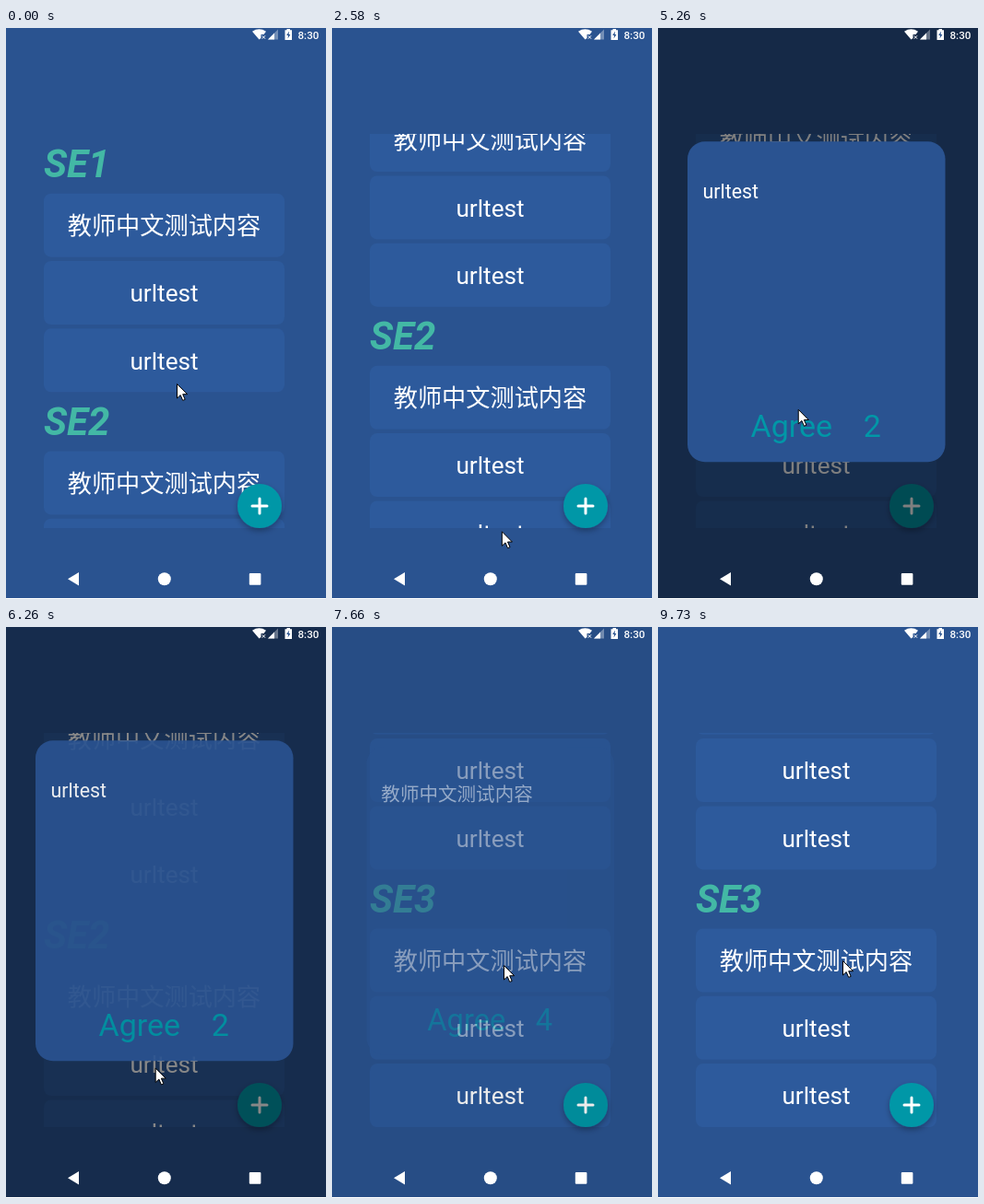
These frames come from a looping animation (347 px wide and 620 px high, 9810 ms). An HTML page:

```html
<!DOCTYPE html>
<html lang="zh">
<head>
<meta charset="utf-8">
<title>List and dialog</title>
<style>
  html, body { margin: 0; width: 100%; height: 100%; overflow: hidden; background: #2a5390; }
  svg { display: block; width: 347px; height: 620px; }
  text { font-family: Roboto, "Noto Sans CJK SC", "Noto Sans CJK", sans-serif; fill: #fff; }
  .card { font-size: 26.2px; text-anchor: middle; }
  .head { font-size: 42px; font-weight: 700; font-style: italic; fill: #43b8a5; }
  .agree { font-size: 34px; fill: #0097a7; }
</style>
</head>
<body>
<svg viewBox="0 0 347 620">
  <defs>
    <clipPath id="viewport"><rect x="41" y="115" width="261" height="428"/></clipPath>
    <filter id="shadow" x="-30%" y="-30%" width="160%" height="170%">
      <feDropShadow dx="0" dy="3" stdDeviation="3" flood-color="#000" flood-opacity=".3"/>
    </filter>
  </defs>
  <rect width="347" height="620" fill="#2a5390"/>
  <g clip-path="url(#viewport)">
    <g id="list"></g>
    <circle id="glow" cx="165" r="460" fill="#43b8a5"/>
  </g>
  <circle cx="275" cy="519" r="24" fill="#0097a7" filter="url(#shadow)"/>
  <path d="M267 519H283M275 511V527" stroke="#fff" stroke-width="3" stroke-linecap="round"/>
  <rect id="dim" width="347" height="620"/>

  <g id="dialog">
    <rect x="32" y="123.3" width="279.5" height="348" rx="19" fill="#2a5391"/>
    <text id="message" x="48.5" y="184.5" font-size="21.4"></text>
    <text class="agree" x="100.5" y="444">Agree</text>
    <text class="agree" id="count" x="222.8" y="444"></text>
  </g>

  <g fill="#fff">
    <path d="M267 3.7Q274.5 -1.2 282 3.7L279.5 7H276.5V11L274.5 12.5Z"/>
    <path d="M277.8 8.3L281 11.7M281 8.3L277.8 11.7" stroke="#fff"/>
    <path d="M284 12.5L295 1.5V12.5Z" opacity=".35"/>
    <path d="M284 12.5L291 5.5V12.5Z"/>
    <path d="M302.5 2.2H304.5V1H308V2.2H310V13H302.5Z"/>
    <path d="M307 3.5L304.2 8H306L305.6 11.5L308.4 7H306.6Z" fill="#2a5390"/>
    <text x="316.5" y="11.6" font-size="11.6" font-weight="500">8:30</text>
    <path d="M67 598.3L79 591V605.6Z"/>
    <circle cx="171.8" cy="598.3" r="7"/>
    <rect x="263.8" y="592" width="12.6" height="12.8" rx="1"/>
    <rect y="619" width="347" height="1"/>
  </g>

  <g id="cursor">
    <circle id="ring" cx="8" cy="9" r="29" fill="none" stroke="#fff" stroke-width="1.5" stroke-opacity=".5"/>
    <path d="M.5 .5V16L4.2 12.6L6.7 18.4L9.2 17.4L6.7 11.7H11.6Z" fill="#fff" stroke="#000"/>
  </g>
</svg>
<script>
const LOOP = 9810;
const FRAME = 1000 / 13, PHASE = 37;
const CHINESE = "教师中文测试内容";
const $ = id => document.getElementById(id);
const ramp = (t, from, to) => Math.max(0, Math.min(1, (t - from) / (to - from)));

// Three sections, each a heading and three cards.
const SECTION = 279.7, PITCH = 73.3;
let rows = "";
for (let s = 0; s < 3; s++) {
  const top = s * SECTION;
  rows += `<text class="head" x="41" y="${top + 162}">SE${s + 1}</text>`;
  for (let c = 0; c < 3; c++) {
    const y = top + 179.7 + c * PITCH;
    rows += `<rect x="41" y="${y}" width="261" height="69" rx="8" fill="#2d5a9c"/>
      <text class="card" x="171.5" y="${y + 44.4}">${c ? "urltest" : CHINESE}</text>`;
  }
}
$("list").innerHTML = rows;

// The three drags move the list together with the cursor.
const dragUp = { from: 945, to: 1300, x: 200, y: 101 };
const dragDown = { from: 1945, to: 2450, x: 184, y: 580 };
const dragOn = { from: 6500, to: 6860, x: 188, y: 171 };
const moves = [
  { from: 400, to: 730, x: 187, y: 415 },
  dragUp,
  { from: 1300, to: 1737, x: 203, y: 256 },
  dragDown,
  { from: 2530, to: 3040, x: 182, y: 202 },
  { from: 4080, to: 5030, x: 173, y: 462 },
  { from: 5030, to: 5410, x: 139, y: 385 },
  { from: 5410, to: 5570, x: 159, y: 477 },
  { from: 6240, to: 6490, x: 183, y: 490 },
  dragOn,
  { from: 6930, to: 7260, x: 186, y: 367 },
  { from: 7700, to: 8190, x: 168, y: 486 },
  { from: 9115, to: 9725, x: 200, y: 362 }
];
const dialogs = [
  { open: 3614, dismiss: 5720, close: 6255, message: "urltest", count: 2 },
  { open: 7617, dismiss: 8270, close: 9115, message: CHINESE, count: 4 }
];

function cursorAt(t) {
  return moves.reduce((p, m) => {
    const k = ramp(t, m.from, m.to);
    return { x: p.x + (m.x - p.x) * k, y: p.y + (m.y - p.y) * k };
  }, { x: 185, y: 386 });
}

function scrollAt(t) {
  const fling = 140;
  return 416.6 * ramp(t, dragUp.from, dragUp.to + fling)
    - 324 * ramp(t, dragDown.from, dragDown.to)
    + 319 * ramp(t, dragOn.from, dragOn.to);
}

function ringShown(t, d) {
  const opening = t >= d.open - 275 && t < d.open - 275 + FRAME;
  const blink = Math.floor((t - d.dismiss) / FRAME + 0.2);
  return opening || (blink >= 0 && blink < 5 && blink % 2 === 0);
}

function drawDialog(t) {
  const d = dialogs[t < 7300 ? 0 : 1];
  const grown = ramp(t, d.open, d.open + 70);
  const shown = grown * (1 - ramp(t, d.close, d.close + 150));
  const dimmed = ramp(t, d.open, d.open + 230) * (1 - ramp(t, d.close, d.close + 230));
  $("message").textContent = d.message;
  $("count").textContent = d.count;
  $("dim").setAttribute("opacity", 0.5 * dimmed);
  $("dialog").setAttribute("opacity", shown);
  $("dialog").setAttribute("transform",
    `translate(171.5 297) scale(${0.92 + 0.08 * grown}) translate(-171.5 -297)`);
  $("ring").setAttribute("visibility", ringShown(t, d) ? "visible" : "hidden");
}

function draw(time) {
  const t = Math.floor((time - PHASE) / FRAME + 0.2) * FRAME + PHASE;
  const { x, y } = cursorAt(t);
  const glow = ramp(t, 1400, 1520) * (1 - ramp(t, 1680, 1960));
  $("cursor").setAttribute("transform", `translate(${x} ${y})`);
  $("list").setAttribute("transform", `translate(0 ${-scrollAt(t)})`);
  $("glow").setAttribute("cy", 543 - 43 * glow + 460);
  $("glow").setAttribute("opacity", 0.52 * glow);
  drawDialog(t);
}

const start = performance.now();
function tick() {
  draw((performance.now() - start) % LOOP);
  requestAnimationFrame(tick);
}
tick();
</script>
</body>
</html>
```
